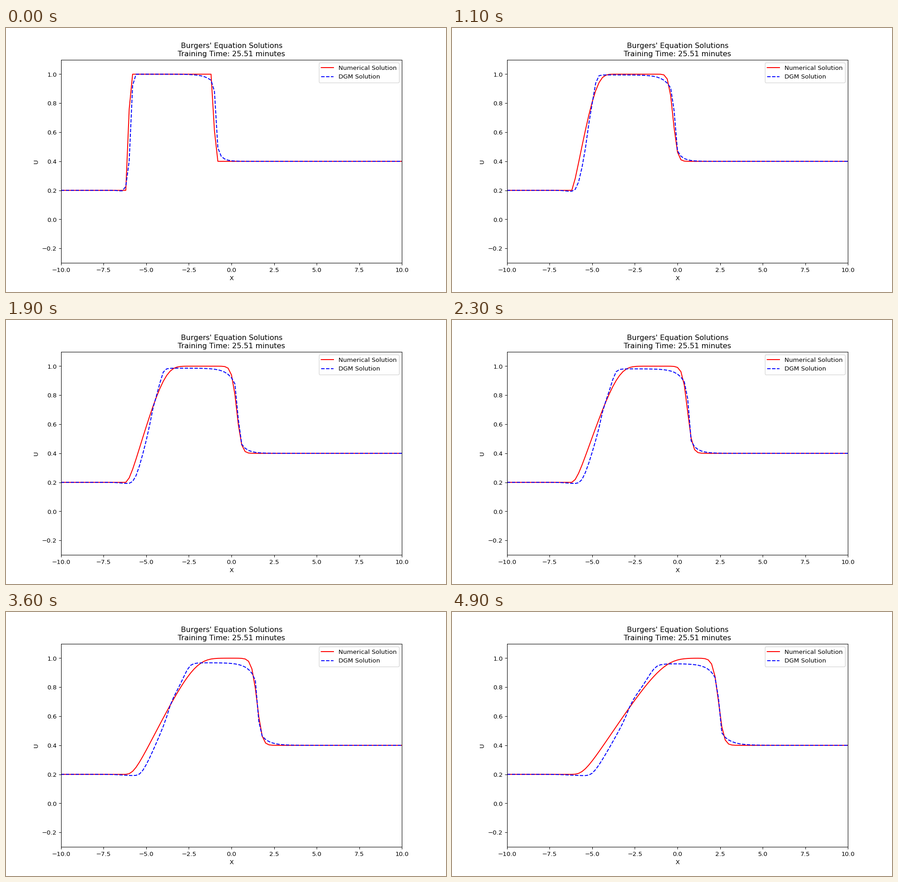
Animation, 966 px wide and 580 px high, one loop 5000 ms. Source, as a matplotlib script:

```python
import numpy as np
import matplotlib.pyplot as plt
from matplotlib.animation import FuncAnimation

FRAMES, DT, DX = 50, 0.1, 0.2
x = np.linspace(-10, 10, 101)


def falling_step(z):
    """Logistic step from 1 down to 0."""
    return (1 - np.tanh(z / 2)) / 2


def rarefaction(t, low, top):
    """Rising front: every level u travels at nearly its own speed."""
    phase = np.linspace(0.001, np.pi - 0.001, 3000)
    u = low + (top - low) * (1 - np.cos(phase)) / 2
    start = -5.9 + 0.13 * u + 0.1 * np.log(u - low)
    speed = 0.08 + 0.86 * u - 0.03 * np.exp(-((u - 0.7) / 0.1) ** 2)
    shoulder = (0.05 + 0.05 * t) * np.log1p(0.02 / (top - u))
    return np.interp(x, start + speed * t + shoulder, u)


def network_solution(t):
    """Smooth rising front, sagging plateau and a softened moving shock."""
    top = 1 - 0.041 * (1 - np.exp(-(t / 3) ** 2))
    rise = rarefaction(t, 0.19, top)
    rise += 0.01 * falling_step((x + 6.55 - 0.06 * t) / (0.1 + 0.06 * t))

    xi = x + 0.92 - 0.685 * t
    sag = (0.157 - 0.08 * np.exp(-2 * t)) * np.exp(-abs(xi) / 0.45)
    tail = 0.11 * np.exp(-abs(xi) / (0.27 + 0.05 * t))
    behind, ahead = rise - sag, 0.4 + tail
    return ahead + (behind - ahead) * falling_step(xi / 0.04)


def upwind_solutions():
    """Conservative upwind scheme for u_t + (u^2 / 2)_x = 0."""
    u = np.where(x < -6.1, 0.2, np.where(x < -1.1, 1.0, 0.4))
    history = []
    for _ in range(FRAMES):
        u = u.copy()
        u[1:] -= DT / DX * np.diff(u ** 2 / 2)
        history.append(u)
    return history


numerical = upwind_solutions()
network = [network_solution(n * DT) for n in range(FRAMES)]

# 966 x 580 pixels; the sliver on top keeps rounding from losing one.
fig, ax = plt.subplots(figsize=(10.0001, 6.0042), dpi=96.6)
red_line, = ax.plot(x, numerical[0], "r-", label="Numerical Solution")
blue_line, = ax.plot(x, network[0], "b--", label="DGM Solution")
ax.set(xlim=(-10, 10), ylim=(-0.3, 1.1), xlabel="X", ylabel="U",
       title="Burgers' Equation Solutions\nTraining Time: 25.51 minutes")
ax.legend(loc="upper right")


def update(n):
    red_line.set_ydata(numerical[n])
    blue_line.set_ydata(network[n])
    return red_line, blue_line


anim = FuncAnimation(fig, update, frames=FRAMES, interval=100,
                     repeat=True, repeat_delay=0)
plt.show()
```
